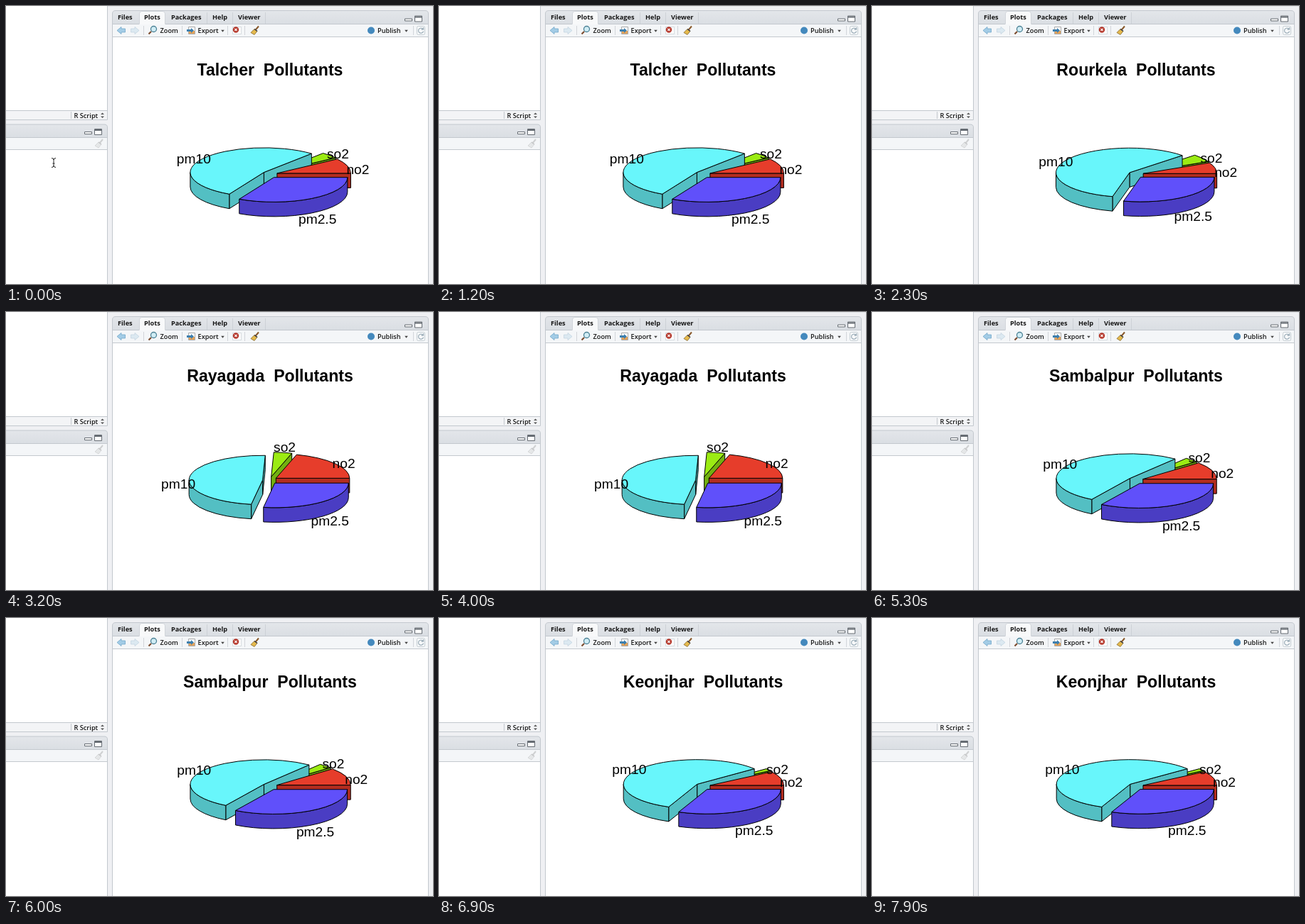
An HTML page for the animation above (8000 ms loop, 600x392 px).

```html
<!DOCTYPE html>
<html lang="en">
<head>
<meta charset="utf-8">
<title>Pollutants by city</title>
<style>
  html, body { margin: 0; width: 100%; height: 100%; overflow: hidden; background: #fff; }
  svg { display: block; width: 100%; height: 100%; }
  .ui { font: 600 9.2px "Open Sans", "Noto Sans", sans-serif; fill: #161616; }
  .tab { font-weight: 700; }
  .plot { font: 19.2px "Liberation Sans", Arial, sans-serif; text-anchor: middle; fill: #000; }
  .title { font-size: 23.1px; font-weight: 700; }
  .line { fill: none; stroke: #c3c8ce; }
  .icon { fill: none; stroke: #666c73; }
  .pie path { stroke: #000; stroke-width: 1; stroke-linejoin: round; }
</style>
</head>
<body>
<svg viewBox="0 0 600 392">
  <defs>
    <linearGradient id="bar" x2="0" y2="1">
      <stop stop-color="#e3e6ea"/><stop offset="1" stop-color="#dadee3"/>
    </linearGradient>
    <g id="windowButtons" class="icon">
      <path d="M.5 2.5h10v3h-10z" fill="#fff"/>
      <path d="M14.5 -1.5h10v8h-10z" fill="#fff"/>
      <path d="M15 0h9" stroke-width="2"/>
    </g>
    <path id="arrow" d="M-6 0L0 -5V-2.5H5.5V2.5H0V5Z"/>
    <g id="broom">
      <path d="M5 -6L0 0" fill="none" stroke="#8a5a2c" stroke-width="2"/>
      <path d="M-1 -2L3 1L-1 6L-6 3Z" fill="#e5ba4d" stroke="#85662c" stroke-width=".8"/>
      <path d="M-1 -2L3 1" stroke="#373b46" stroke-width="1.5"/>
    </g>
    <path id="caret" d="M-2.3 -1.2H2.3L0 1.8Z" fill="#444"/>
  </defs>

  <rect width="600" height="392" fill="#eff0f3"/>

  <g id="leftPanes">
    <rect width="142.5" height="147.5" fill="#fff"/>
    <rect y="147.5" width="142.5" height="13" fill="#f3f4f6"/>
    <path class="line" d="M0 147.5H142.5M142.5 0V160.5H0M91.5 149V159"/>
    <text class="ui" x="95.5" y="157.5">R Script</text>
    <path d="M133 153L135.5 150.5L138 153ZM133 155.5L135.5 158L138 155.5Z" fill="#555"/>

    <path d="M0 167H138Q142.5 167 142.5 171V392H0Z" fill="#fff"/>
    <path d="M0 167H138Q142.5 167 142.5 171V185.5H0Z" fill="url(#bar)"/>
    <rect y="185.5" width="142.5" height="17" fill="#f4f6f8"/>
    <path class="line" d="M0 167H138Q142.5 167 142.5 171V392M0 185.5H142M0 202.5H142"/>
    <use href="#windowButtons" x="110" y="175"/>
    <use href="#broom" x="131" y="194" opacity=".25" style="filter:grayscale(1)"/>
  </g>

  <g id="plotPane">
    <path d="M143 0H600" class="line" opacity=".5"/>
    <path d="M149.5 392V11Q149.5 6.5 154 6.5H589Q593.5 6.5 593.5 11V392Z" fill="#fff"/>
    <path d="M149.5 25.5V11Q149.5 6.5 154 6.5H589Q593.5 6.5 593.5 11V25.5Z" fill="url(#bar)"/>
    <rect x="149.5" y="25.5" width="444" height="17.5" fill="#f4f6f8"/>
    <path class="line" d="M149.5 392V11Q149.5 6.5 154 6.5H589Q593.5 6.5 593.5 11V392M149.5 25.5H593M149.5 43.5H593"/>
    <path d="M187.5 26V11Q187.5 7.5 191 7.5H220Q223.5 7.5 223.5 11V26" fill="#f8f9fa"/>
    <path class="line" d="M187.5 25V11Q187.5 7.5 191 7.5H220Q223.5 7.5 223.5 11V25M282.5 9V25M318.5 9V25M364.5 9V25" opacity=".65"/>
    <g class="ui tab" id="tabs"></g>
    <use href="#windowButtons" x="560" y="15.5"/>

    <use href="#arrow" x="162" y="34.5" fill="#a3cce6" stroke="#72a7c9" stroke-width=".8"/>
    <use href="#arrow" transform="translate(181 34.5) scale(-1 1)" fill="#dce9f1" stroke="#c4d5e1" stroke-width=".8"/>
    <path class="line" d="M193.5 28V41M247.5 28V41M311.5 28V41M335.5 28V41M572.5 28V41" opacity=".7"/>
    <path d="M204 36L200.5 39.5" stroke="#7c4c2e" stroke-width="2.2"/>
    <circle cx="207.5" cy="32.5" r="4" fill="#d1edf5" stroke="#4d8296" stroke-width="1.3"/>
    <path d="M256.5 29.5H265.5V39.5H256.5Z" fill="#fff" stroke="#aaa"/>
    <path d="M257 35H265V39H257Z" fill="#e4a35a"/>
    <path d="M254 33H260V31L264 34.5L260 38V36H254Z" fill="#3d7fae"/>
    <rect x="318.5" y="29.5" width="12" height="10" fill="#fff" stroke="#d7dce0"/>
    <circle cx="323" cy="33.5" r="4.2" fill="#b5382c"/>
    <path d="M321.3 31.8L324.7 35.2M324.7 31.8L321.3 35.2" stroke="#fff" stroke-width="1.2"/>
    <use href="#broom" x="350" y="34.5"/>
    <circle cx="513" cy="34.5" r="5" fill="#4489bd"/>
    <use href="#caret" x="304.5" y="35"/>
    <use href="#caret" x="562.5" y="35"/>
    <g fill="none" stroke="#c3ccd2">
      <rect x="577.5" y="28.5" width="11" height="12" rx="2" fill="#fafbfc"/>
      <path d="M586 32.5A3.6 3.6 0 1 0 586.6 35.5M586.5 30V33H583.5" stroke="#9fb0bb" stroke-width="1.3"/>
    </g>
    <g class="ui">
      <text x="216.5" y="38">Zoom</text>
      <text x="269.5" y="38">Export</text>
      <text x="522" y="38">Publish</text>
    </g>
  </g>

  <text class="plot title" id="title" x="371" y="98"></text>
  <g class="pie" id="pie"></g>
  <g class="plot" id="labels"></g>
  <path id="cursor" d="M64 214.5Q67 214.5 67 217V225Q67 227.5 64 227.5M70 214.5Q67 214.5 67 217M67 225Q67 227.5 70 227.5M65.5 222H68.5" fill="none" stroke="#222"/>
</svg>
<script>
const LOOP = 8000;
const CURSOR_HIDES = 500;
const CENTER = { x: 371, y: 237.4 };
const RX = 103.5, RY = 34.7, DEPTH = 20.5;
const EXPLODE_X = 10.4, EXPLODE_Y = 5;

// ends: angles in degrees where no2, so2 and pm10 stop; pm2.5 fills the rest
const cities = [
  { from: 0,    name: "Talcher",   ends: [35.3, 49.7, 242] },
  { from: 1400, name: "Rourkela",  ends: [26, 44.3, 256.6] },
  { from: 3100, name: "Rayagada",  ends: [73.7, 88, 261.1] },
  { from: 4100, name: "Cuttack",   ends: [72.3, 78.9, 274.1] },
  { from: 5000, name: "Sambalpur", ends: [41.1, 52.2, 238.8] },
  { from: 6900, name: "Keonjhar",  ends: [33.5, 39, 247.3] },
];
const slices = [
  { name: "no2",   top: "#e63d2b", wall: "#b32d20" },
  { name: "so2",   top: "#9beb13", wall: "#72b010" },
  { name: "pm10",  top: "#68f6fb", wall: "#53bfc3" },
  { name: "pm2.5", top: "#6050fa", wall: "#4a3dc3" },
];
const PAINT_ORDER = [1, 2, 0, 3];

const byId = id => document.getElementById(id);
const cos = deg => Math.cos(deg * Math.PI / 180);
const sin = deg => Math.sin(deg * Math.PI / 180);

function sector(slice, start, end) {
  const mid = (start + end) / 2;
  const apex = [CENTER.x + EXPLODE_X * cos(mid), CENTER.y - EXPLODE_Y * sin(mid)];
  const rim = deg => [apex[0] + RX * cos(deg), apex[1] - RY * sin(deg)];
  const drop = ([x, y]) => [x, y + DEPTH];
  const point = p => p.map(v => v.toFixed(2)).join(" ");
  const arc = (a, b, p) =>
    `A${RX} ${RY} 0 ${Math.abs(b - a) > 180 ? 1 : 0} ${b > a ? 0 : 1} ${point(p)}`;
  const path = (d, fill) => `<path d="${d}Z" fill="${fill}"/>`;
  const side = deg => path("M" + [apex, rim(deg), drop(rim(deg)), drop(apex)].map(point).join("L"), slice.wall);

  let out = "";
  if (cos(start) > 0) out += side(start);
  if (cos(end) < 0) out += side(end);
  if (end > 180) {
    const a = Math.max(start, 180);
    out += path(`M${point(rim(a))}${arc(a, end, rim(end))}L${point(drop(rim(end)))}` +
      arc(end, a, drop(rim(a))), slice.wall);
  }
  return out + path(`M${point(apex)}L${point(rim(start))}${arc(start, end, rim(end))}`, slice.top);
}

function label(slice, start, end) {
  const mid = (start + end) / 2;
  const x = CENTER.x + 129.5 * cos(mid);
  const y = 254.3 - 58 * sin(mid) + (sin(mid) < 0 ? 3 : 0);
  return `<text x="${x.toFixed(2)}" y="${y.toFixed(2)}">${slice.name}</text>`;
}

function drawCity({ name, ends }) {
  const bounds = [0, ...ends, 360];
  const part = (draw, i) => draw(slices[i], bounds[i], bounds[i + 1]);
  byId("title").textContent = `${name}\u00a0\u00a0Pollutants`;
  byId("pie").innerHTML = PAINT_ORDER.map(i => part(sector, i)).join("");
  byId("labels").innerHTML = slices.map((_, i) => part(label, i)).join("");
}

const tabs = { Files: 157, Plots: 194, Packages: 232, Help: 290, Viewer: 326 };
byId("tabs").innerHTML = Object.entries(tabs)
  .map(([name, x]) => `<text x="${x}" y="19.3">${name}</text>`).join("");

let shown;
function render(ms) {
  const t = ms % LOOP;
  const city = cities.findLast(c => c.from <= t);
  if (city !== shown) drawCity(shown = city);
  byId("cursor").style.display = t < CURSOR_HIDES ? "" : "none";
}

const began = performance.now();
function tick() {
  render(performance.now() - began);
  requestAnimationFrame(tick);
}
tick();
</script>
</body>
</html>
```
